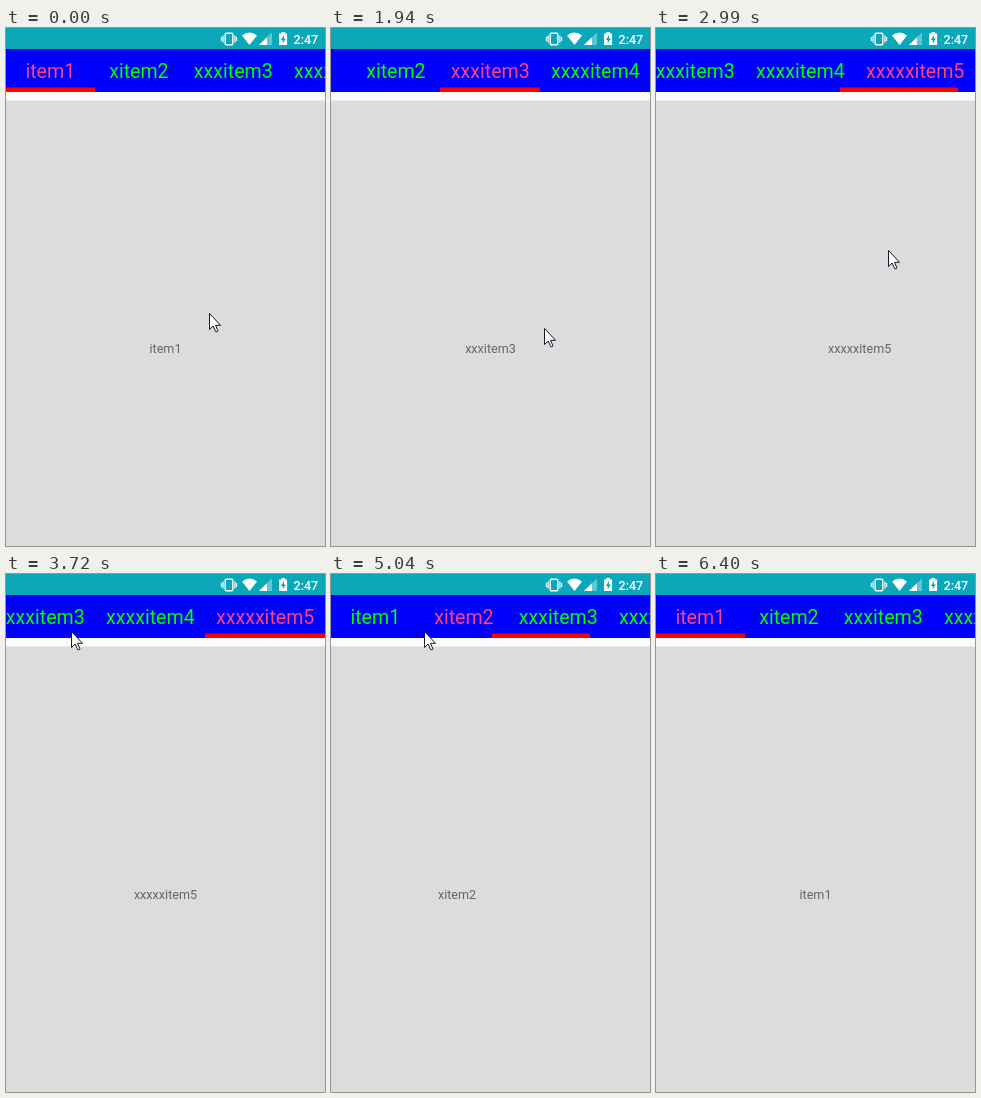
An HTML page that plays this animation: 319x518 px, repeating every 6670 ms.

```html
<!DOCTYPE html>
<html lang="en">
<head>
<meta charset="utf-8">
<title>Scrolling tabs</title>
<style>
  html, body { margin: 0; width: 100%; height: 100%; overflow: hidden; background: #dcdcdc; }
  svg { display: block; font-family: Roboto, sans-serif; }
  #tabs text { font-size: 19.6px; fill: #0f0; text-anchor: middle; }
  #tabs text.on { fill: #ff4081; }
  #pages text { font-size: 12.6px; fill: #656565; text-anchor: middle; }
</style>
</head>
<body>
<svg width="319" height="518" viewBox="0 0 319 518">
  <rect width="319" height="518" fill="#dcdcdc"/>
  <g id="pages"></g>
  <rect y="64" width="319" height="8.5" fill="#fafafa"/>
  <rect y="21" width="319" height="43" fill="#00f"/>
  <g id="tabs"><rect id="bar" y="59.5" height="4.5" fill="red"/></g>
  <rect width="319" height="21" fill="#0ca8ba"/>
  <g fill="#fff">
    <rect x="219.2" y="5.2" width="7.6" height="11.6" rx="1" fill="none" stroke="#fff" stroke-width="1.4"/>
    <path d="M216.5 7.5h1.2v7h-1.2zM228.3 7.5h1.2v7h-1.2zM214.8 9h1.1v4h-1.1zM230.1 9h1.1v4h-1.1z"/>
    <path d="M236 7.4Q243.5 1.8 251 7.4L243.5 17Z"/>
    <path d="M253 17H266V4.5Z" opacity=".35"/>
    <path d="M253 17H261V9.3Z"/>
    <path d="M275.5 4h3.6v1.4h2v11.6h-8V5.4h2.4z"/>
    <path d="M278 7l-3.2 5h1.9v3.4l3.2-5H278z" fill="#0ca8ba"/>
    <text x="287.6" y="15.5" font-size="12.5" font-weight="500">2:47</text>
  </g>
  <path id="cursor" d="M.5 .5V16.5L4.2 13 6.7 18.7H8.3L9 18 6.6 12.3H11.5Z" fill="#fff" stroke="#16162c" stroke-linejoin="round"/>
</svg>
<script>
const LOOP = 6670, TICK = 134.4, W = 319;
const names = ['item1', 'xitem2', 'xxxitem3', 'xxxxitem4', 'xxxxxitem5'];
const $ = id => document.getElementById(id);

// All times below are in ticks. Swipes drag the underline along with the page;
// after a tap it takes its own time, until barEnd.
const moves = [
  { start: 6, end: 9, to: 1 },
  { start: 10, end: 14, to: 2 },
  { start: 14, end: 20, to: 3 },
  { start: 20, end: 23, to: 4 },
  { start: 27.5, end: 32, to: 2, barEnd: 32.7 },
  { start: 36, end: 37.4, to: 1, barEnd: 39.7 },
  { start: 41, end: 43.6, to: 0, barEnd: 44 },
];

// Pointer stops: [time, x, y]
const stops = [[0, 203, 285], [2, 236, 294], [5, 236, 294], [6, 88, 285], [9, 229, 295],
  [10, 210, 294], [12, 85, 290], [14, 213, 300], [17, 90, 280], [20, 215, 250],
  [21, 115, 235], [22, 232, 222], [25, 214, 170], [27, 65, 57], [31, 58, 50],
  [37, 93, 57], [40, 43, 48], [42, 43, 48], [44, 187, 417], [47, 272, 540]];

const clamp = (v, lo, hi) => Math.max(lo, Math.min(hi, v));
const mix = (a, b, f) => a + (b - a) * f;
const progress = (n, start, end) => clamp((n - start) / (end - start), 0, 1);
const easeOut = u => 1 - (1 - u) ** 1.8;
const smooth = u => u * u * (3 - 2 * u);

const pageAt = n => moves.reduce((p, m) =>
  mix(p, m.to, easeOut(progress(n, m.start, m.end))), 0);
const barAt = n => moves.reduce((p, m) => mix(p, m.to, m.barEnd
  ? smooth(progress(n, m.start, m.barEnd))
  : easeOut(progress(n, m.start, m.end))), 0);

function along(list, p) {
  const i = clamp(Math.floor(p), 0, list.length - 2);
  return mix(list[i], list[i + 1], p - i);
}

function pointerAt(n) {
  const i = stops.findIndex(s => s[0] > n);
  if (i < 0) return stops.at(-1).slice(1);
  const a = stops[i - 1], b = stops[i], f = progress(n, a[0], b[0]);
  return [mix(a[1], b[1], f), mix(a[2], b[2], f)];
}

function addText(parent, str, x, y) {
  const el = document.createElementNS('http://www.w3.org/2000/svg', 'text');
  el.textContent = str;
  el.setAttribute('x', x);
  el.setAttribute('y', y);
  return parent.appendChild(el);
}

// Tabs fit their labels, with padding and a minimum width
const labels = names.map(name => addText($('tabs'), name, 0, 50));
const edges = [0], centers = [];
labels.forEach((el, i) => {
  edges.push(edges[i] + Math.max(88.6, el.getComputedTextLength() + 21.3));
  centers.push((edges[i] + edges[i + 1]) / 2);
  el.setAttribute('x', centers[i]);
  addText($('pages'), names[i], W * (i + .5), 325);
});

const shift = (id, x, y = 0) => $(id).setAttribute('transform', `translate(${x} ${y})`);

function draw(n) {
  const page = pageAt(n), bar = barAt(n);
  const left = Math.round(along(edges, bar)), right = Math.round(along(edges, bar + 1));
  const scroll = along(centers, mix(page, bar, .19)) - W / 2;
  shift('pages', -W * page);
  shift('tabs', -Math.round(clamp(scroll, 0, edges.at(-1) - W)));
  shift('cursor', ...pointerAt(n));
  $('bar').setAttribute('x', left);
  $('bar').setAttribute('width', right - left);
  labels.forEach((el, i) => el.classList.toggle('on', i === Math.round(page)));
}

const start = performance.now();
function loop() {
  const t = (performance.now() - start) % LOOP;
  draw(Math.max(0, Math.floor((t - 28) / TICK)));
  requestAnimationFrame(loop);
}
loop();
</script>
</body>
</html>
```
